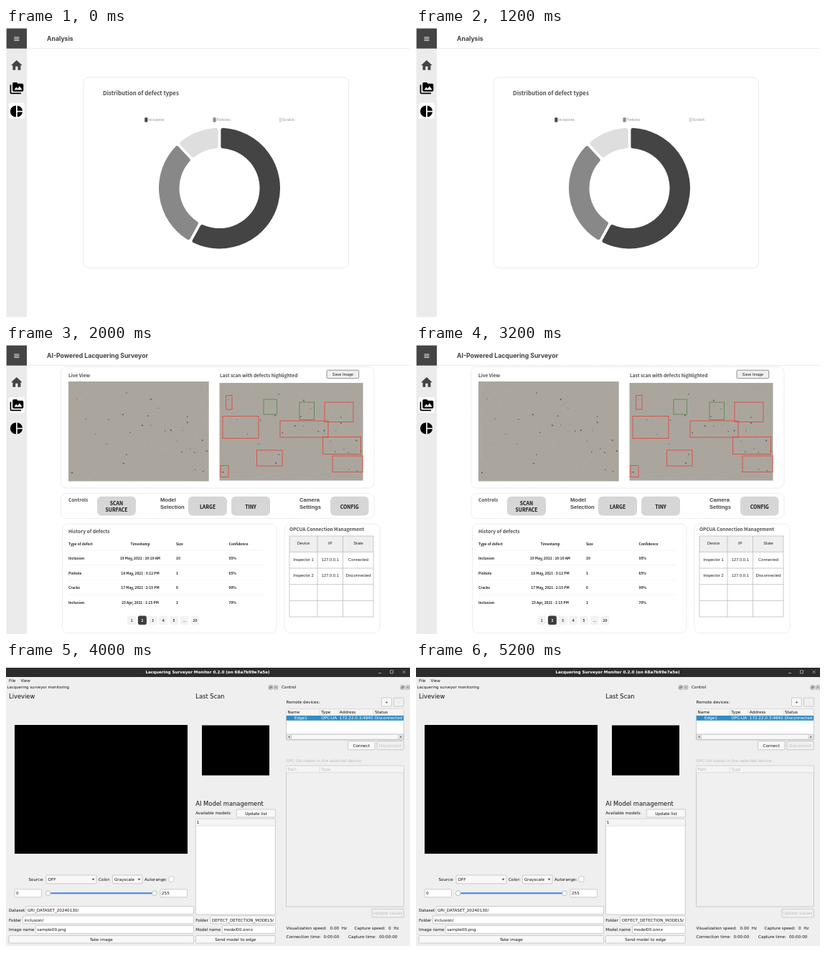
An HTML page that plays this animation: 563 by 404 pixels, repeating every 6 s.

```html
<!DOCTYPE html>
<html lang="en">
<head>
<meta charset="utf-8">
<title>Inspection screens</title>
<style>
html, body { margin: 0; width: 100%; height: 100%; overflow: hidden; background: #fff; }
svg { display: block; width: 563px; height: 404px; }
text { white-space: pre; }
.head { font-family: Inter, sans-serif; font-weight: 700; font-size: 8.7px; fill: #404040; }
.label { font-family: "Noto Sans CJK JP", "Noto Sans CJK SC", "Noto Sans", sans-serif; font-weight: 700; font-size: 6.5px; fill: #505050; }
.arial { font-family: "Liberation Sans", Arial, sans-serif; font-size: 5.8px; fill: #222; }
.qt { font-family: "DejaVu Sans", sans-serif; font-size: 5.65px; fill: #111; }
</style>
</head>
<body>
<svg id="stage" viewBox="0 0 563 404"></svg>
<script>
const box = (x, y, x2, y2, fill, stroke = 'none', r = 0, extra = '') =>
  `<rect x="${x}" y="${y}" width="${x2 - x}" height="${y2 - y}" rx="${r}" fill="${fill}" stroke="${stroke}" ${extra}/>`;
const text = (kind, x, y, s, style = '') => `<text class="${kind}" x="${x}" y="${y}" style="${style}">${s}</text>`;
const path = (d, fill, extra = '') => `<path d="${d}" fill="${fill}" ${extra}/>`;
const line = (d, stroke, width = 1) => path(d, 'none', `stroke="${stroke}" stroke-width="${width}"`);
const mid = 'text-anchor:middle;';
const panel = (x, y, x2, y2) => box(x, y, x2, y2, '#fff', '#dedede', 8, 'stroke-width=".7" stroke-dasharray="2 .6"');

// Web dashboard frame shared by the first two screens
function shell(title, activeY) {
  return box(0, 0, 563, 404, '#fff') + box(.5, 0, 29, 404, '#ebebeb') + box(.7, .7, 29, 28.7, '#444') +
    line('M29 28.5H562', '#e6e6e6', .8) +
    line('M11.3 13H18.4M11.3 15.2H18.4M11.3 17.4H18.4', '#fff', .9) +
    box(3.8, activeY, 25.8, activeY + 22, '#fff', 'none', 3) +
    path('M14.8 45L7 52.2H9.4V58.7H13.2V53.8H16.5V58.7H20.4V52.2H22.7Z', '#444') +
    path('M11 76H15L16.5 77.8H22.5Q24.3 77.8 24.3 79.5V87Q24.3 88.7 22.5 88.7H11Q9.2 88.7 9.2 87V77.8Q9.2 76 11 76Z', '#000') +
    path('M11.5 86.5L14.3 82.5L16.3 85L18.8 81.2L22.6 86.5Z', '#fff') +
    line('M6.4 79.5V90.2Q6.4 91.4 7.6 91.4H21', '#000', 1.7) +
    path('M14 108.4A8.1 8.1 0 0 0 14 124.6ZM15.8 108.4V115.7H23A8.1 8.1 0 0 0 15.8 108.4ZM15.8 117.4V124.6A8.1 8.1 0 0 0 23 117.4Z', '#000') +
    text('head', 57, 18.4, title);
}

// Ring slice with a parallel gap; the round-joined stroke softens its corners
function slice(from, to, color) {
  const outer = 81.5, inner = 59, inset = 4.9;
  const at = (r, share, side) => {
    const a = share * 2 * Math.PI + side * Math.asin(inset / r);
    return `${(297.5 + r * Math.sin(a)).toFixed(2)} ${(224 - r * Math.cos(a)).toFixed(2)}`;
  };
  const large = to - from > .5 ? 1 : 0;
  return path(`M${at(outer, from, 1)}A${outer} ${outer} 0 ${large} 1 ${at(outer, to, -1)}` +
    `L${at(inner, to, -1)}A${inner} ${inner} 0 ${large} 0 ${at(inner, from, 1)}Z`,
    color, `stroke="${color}" stroke-width="6" stroke-linejoin="round"`);
}

function analysis() {
  const legend = [[193.3, 'Inclusions', '#444'], [288.5, 'Pinholes', '#888'], [380.5, 'Scratch', '#dedede']];
  return shell('Analysis', 104.5) + box(108, 69, 477.5, 335.5, '#fff', '#e4e4e4', 8, 'stroke-width=".8"') +
    text('label', 135, 94, 'Distribution of defect types', 'font-size:7.9px') +
    legend.map(([x, name, color]) => box(x, 125.3, x + 4, 131.5, color) +
      text('label', x + 4.7, 130.4, name, 'font-size:4.5px;fill:#aaa')).join('') +
    slice(0, .58, '#444') + slice(.58, .88, '#888') + slice(.88, 1, '#dedede');
}

const specks = [[99,75],[168,67],[202,76],[111,103],[143,104],[163,97],[125,124],[173,122],[190,112],[202,112],
  [222,120],[230,119],[246,119],[253,100],[253,108],[141,138],[168,153],[164,165],[239,134],[245,149],[274,133],
  [257,145],[263,150],[280,148],[264,174],[275,176],[92,178],[212,88],[198,99]];

function plate(x, y, x2, y2) {
  let seed = 7, grain = '';
  const random = () => (seed = seed * 16807 % 2147483647) / 2147483647;
  for (let i = 0; i < 500; i++)
    grain += `M${(x + 1 + random() * (x2 - x - 2)).toFixed(1)} ${(y + 1 + random() * (y2 - y - 2)).toFixed(1)}h.8`;
  return box(x, y, x2, y2, '#aaa69e') + line(grain, '#98948d', .7) +
    specks.map(([sx, sy], i) => {
      const cx = x + (sx - 87) / 196 * (x2 - x), cy = y + (sy - 51) / 139 * (y2 - y);
      return `<circle cx="${cx}" cy="${cy}" r="${.6 + i % 3 * .2}" fill="#50555c"/>`;
    }).join('');
}

function inspection() {
  const red = [[306.5,70.5,315,90],[302,99.5,352,130.5],[444,80,484,107.5],[382,106,449,129],
    [441.5,128.5,494.5,152.5],[455,155,497,177.5],[349.5,147,385,169],[299,168.5,310,184.5]];
  const green = [[359,76,377.5,97],[409,80,429.5,104.5]];
  const outline = color => b => box(...b, 'none', color, 0, 'stroke-width=".9"');
  const button = (x, x2, ...lines) => box(x, 211.7, x2, 238.5, '#d6d6d6', 'none', 6) +
    lines.map((s, i) => text('label', (x + x2) / 2, (lines.length > 1 ? 223.6 : 228.6) + i * 9.2, s,
      mid + 'font-size:6.9px;fill:#111')).join('');
  const records = [['Type of defect', 'Timestamp', 'Size', 'Confidence'],
    ['Inclusion', '19 May, 2021 : 10:10 AM', '10', '95%'],
    ['Pinhole', '18 May, 2021 : 3:12 PM', '1', '65%'],
    ['Cracks', '17 May, 2021 : 2:15 PM', '6', '90%'],
    ['Inclusion', '23 Apr, 2021 : 1:15 PM', '1', '70%']];
  const devices = [['Device', 'IP', 'State'], ['Inspector 1', '127.0.0.1', 'Connected'],
    ['Inspector 2', '127.0.0.1', 'Disconnected']];
  return shell('AI-Powered Lacquering Surveyor', 73) + panel(76.5, 30.5, 513, 200) +
    text('label', 87, 44.9, 'Live View') + text('label', 298, 45.2, 'Last scan with defects highlighted') +
    box(447, 35.2, 491.7, 46.7, '#efefef', '#777', 1.5, 'stroke-width=".8"') +
    text('arial', 469.5, 43, 'Save Image', mid + 'font-size:5.5px') +
    plate(87, 51, 282.7, 190.5) + plate(297.5, 53, 497.5, 189.5) +
    red.map(outline('#df4a3d')).join('') + green.map(outline('#5e8a50')).join('') +
    panel(76.5, 207.5, 513, 242.5) + text('label', 87, 219.3, 'Controls') +
    button(127, 181, 'SCAN', 'SURFACE') + button(254, 308, 'LARGE') +
    button(314, 368, 'TINY') + button(452, 505.5, 'CONFIG') +
    [[215, 'Model', 'Selection'], [409, 'Camera', 'Settings']].map(([x, a, b]) =>
      text('arial', x, 219.2, a, 'font-size:7.6px;font-weight:700;fill:#444') +
      text('arial', x, 228.6, b, 'font-size:7.6px;font-weight:700;fill:#444')).join('') +
    panel(78.5, 250, 377, 402.5) + text('label', 87, 262.5, 'History of defects', 'font-size:6.7px') +
    records.map((row, r) => {
      const y = 279.5 + r * 20.6;
      return row.map((s, c) => text('label', [87, 187, 237, 310.5][c], y, s,
        (c === 1 ? mid : '') + 'font-size:4.9px;fill:#222')).join('') +
        (r < 4 ? line(`M87 ${287 + r * 20.7}H362`, '#efefef', .6) : '');
    }).join('') +
    ['1', '2', '3', '4', '5', '...', '20'].map((s, i) => {
      const x = 175.2 + i * 14.7, on = i === 1;
      return box(x - 6, 378.5, x + 6, 391, on ? '#3e3e3e' : '#f3f3f3', 'none', 2.5) +
        text('label', x, 386.6, s, mid + `font-size:5px;fill:${on ? '#fff' : '#333'}`);
    }).join('') +
    panel(388, 250, 521, 402.5) + text('label', 395, 260.3, 'OPCUA Connection Management') +
    box(395, 267, 512, 289.3, '#efefef') +
    line('M395 267H512V380H395ZM434 267V380M469.5 267V380M395 289.3H512M395 312H512M395 334.7H512M395 357.3H512', '#bcbcbc', .8) +
    devices.map((row, r) => row.map((s, c) =>
      text('arial', [414.5, 451.8, 491][c], 279.2 + r * 22.6, s, mid)).join('')).join('');
}

function monitor() {
  const border = '#b9b9b9', blue = '#308cc6', faint = 'fill:#bdbdbd';
  const thin = 'stroke-width=".7"';
  const qt = (x, y, s, style) => text('qt', x, y, s, style);
  const big = (x, y, s) => qt(x, y, s, 'font-size:8.35px');
  const frame = (x, y, x2, y2, fill = '#fff') => box(x, y, x2, y2, fill, border, 1, thin);
  const field = (x, y, x2, s) => frame(x, y, x2, y + 11) + qt(x + 2, y + 7.6, s);
  const button = (x, y, x2, y2, s, style = '') => frame(x, y, x2, y2, style ? '#f0f0f0' : '#f8f8f8') +
    qt((x + x2) / 2, (y + y2) / 2 + 2, s, mid + style);
  const combo = (x, x2, s) => frame(x, 298, x2, 309.8, '#f8f8f8') + qt(x + 2.5, 305.7, s) +
    path(`M${x2 - 6.5} 302.8h4l-2 2.6z`, '#555');
  const header = (x2, y) => box(390.5, y, x2, y + 9, '#f4f4f4') + line(`M390.5 ${y + 9}H${x2}`, '#d0d0d0', .6);
  const dockFrame = x => box(x, 32.8, x + 5.2, 38.2, '#efefef', '#888', 1, thin);
  const dock = x => dockFrame(x) + line(`M${x + 1.2} 36.9v-1.8h1.8v1.8zM${x + 2.2} 35v-1h1.9v1.9h-1`, '#444', .6) +
    dockFrame(x + 7.3) + line(`M${x + 8.6} 34.2l2.6 2.6m0 -2.6l-2.6 2.6`, '#444', .8);
  const knob = x => `<circle cx="${x}" cy="323.3" r="3.4" fill="#fafafa" stroke="#aaa" stroke-width=".7"/>`;

  return box(0, 0, 563, 404, '#fff') + box(0, 20, 563, 397, '#efefef') + box(0, 8, 563, 21, '#2c2c2c') +
    qt(281, 16, 'Lacquering Surveyor Monitor 0.2.0 (on 68a7b99e7a5e)', mid + 'font-weight:700;font-size:5.6px;fill:#fff') +
    line('M519 15.5h4M535.5 11.8h4v4h-4zM552.5 11.8l4 4m0 -4l-4 4', '#ccc', .7) +
    qt(4, 28.3, 'File') + qt(20.5, 28.3, 'View') +
    qt(1.5, 37.4, 'Lacquering surveyor monitoring', 'font-size:5.4px') + qt(384, 37.4, 'Control') +
    dock(366.2) + dock(550) +
    big(4, 51.2, 'Liveview') + big(264.3, 51.2, 'Last Scan') + big(264.3, 200.7, 'AI Model management') +
    box(12, 88, 253, 268, '#000') + box(273, 88.5, 367, 158.5, '#000') +
    qt(264.3, 213.4, 'Available models:') + button(321.3, 206, 375.5, 217, 'Update list') +
    frame(264.3, 219.3, 375.3, 353) + box(264.7, 219.7, 375, 229, '#f4f4f4') +
    line('M264.7 229H375', '#d0d0d0', .6) + qt(265.8, 226.4, '1') +
    qt(31.5, 305.7, 'Source:') + combo(56, 126, 'OFF') + qt(129, 305.7, 'Color:') + combo(148.5, 190, 'Grayscale') +
    qt(193, 305.7, 'Autorange:') + frame(227, 300, 234, 307) +
    field(12, 317.8, 49.5, '0') + field(215, 317.8, 252.5, '255') +
    box(58, 322.2, 208, 324.3, '#3f87dd', 'none', 1) + knob(58.7) + knob(207) +
    qt(4, 349.1, 'Dataset') + field(28, 341.5, 261.5, 'GRI_DATASET_20240130/') +
    qt(4, 362.5, 'Folder') + field(23.5, 354.9, 261.5, 'inclusion/') +
    qt(4, 376, 'Image name') + field(41.3, 368.4, 261.5, 'sample00.png') +
    button(4, 382.5, 261.5, 393, 'Take image') +
    qt(264.3, 362.5, 'Folder') + field(285, 354.9, 375.3, 'DEFECT_DETECTION_MODELS/') +
    qt(264.3, 376, 'Model name') + field(301.5, 368.4, 375.3, 'model00.onnx') +
    button(264.3, 382.5, 375.3, 393, 'Send model to edge') +
    qt(390.5, 57.6, 'Remote devices:') + button(523.5, 50, 537.3, 62, '+') + button(540.5, 50, 554.3, 62, '-', faint) +
    frame(390.5, 66, 554.3, 109) + header(554, 66) + box(390.8, 75, 554, 81.8, blue) +
    line('M437 66.5V75M463 66.5V75M512 66.5V75', '#d0d0d0', .6) +
    ['Name', 'Type', 'Address', 'Status'].map((s, i) => qt([392.5, 439.3, 464.8, 514][i], 72.4, s)).join('') +
    ['Edge1', 'OPC-UA', '172.22.0.3:4840', 'Disconnected'].map((s, i) =>
      qt([402, 439.3, 464.8, 514][i], 80.4, s, 'fill:#fff')).join('') +
    frame(390.8, 101, 554, 108.3, '#e6e6e6') + frame(397.5, 101, 547, 108.3, '#f8f8f8') +
    path('M395.3 103v3.4l-2 -1.7zM549.5 103v3.4l2 -1.7z', '#555') +
    button(476.5, 110.7, 514, 122.7, 'Connect') + button(517, 110.7, 554.3, 122.7, 'Disconnect', faint) +
    qt(390.5, 140, 'OPC-UA nodes in the selected device:', faint) +
    frame(390.5, 145, 554.3, 342, '#f0f0f0') + header(554, 145.6) + line('M437 146V154.5', '#d0d0d0', .6) +
    qt(392.5, 152.3, 'Path', faint) + qt(439.3, 152.3, 'Type', faint) +
    button(510, 345.2, 554.3, 357, 'Update values', faint) +
    qt(390.5, 374.4, 'Visualization speed:') + qt(451.5, 374.4, '0.00  Hz') +
    qt(485.5, 374.4, 'Capture speed:') + qt(533, 374.4, '0  Hz') +
    qt(390.5, 386.3, 'Connection time:') + qt(442.5, 386.3, '0:00:00') +
    qt(477, 386.3, 'Capture time:') + qt(520, 386.3, '00:00:00');
}

const stage = document.getElementById('stage');
stage.innerHTML = [analysis, inspection, monitor].map(screen => `<g>${screen()}</g>`).join('');
const start = performance.now();

function show() {
  const current = Math.floor((performance.now() - start) / 2000) % 3;
  [...stage.children].forEach((screen, i) => { screen.style.display = i === current ? '' : 'none'; });
  requestAnimationFrame(show);
}
show();
</script>
</body>
</html>
```
